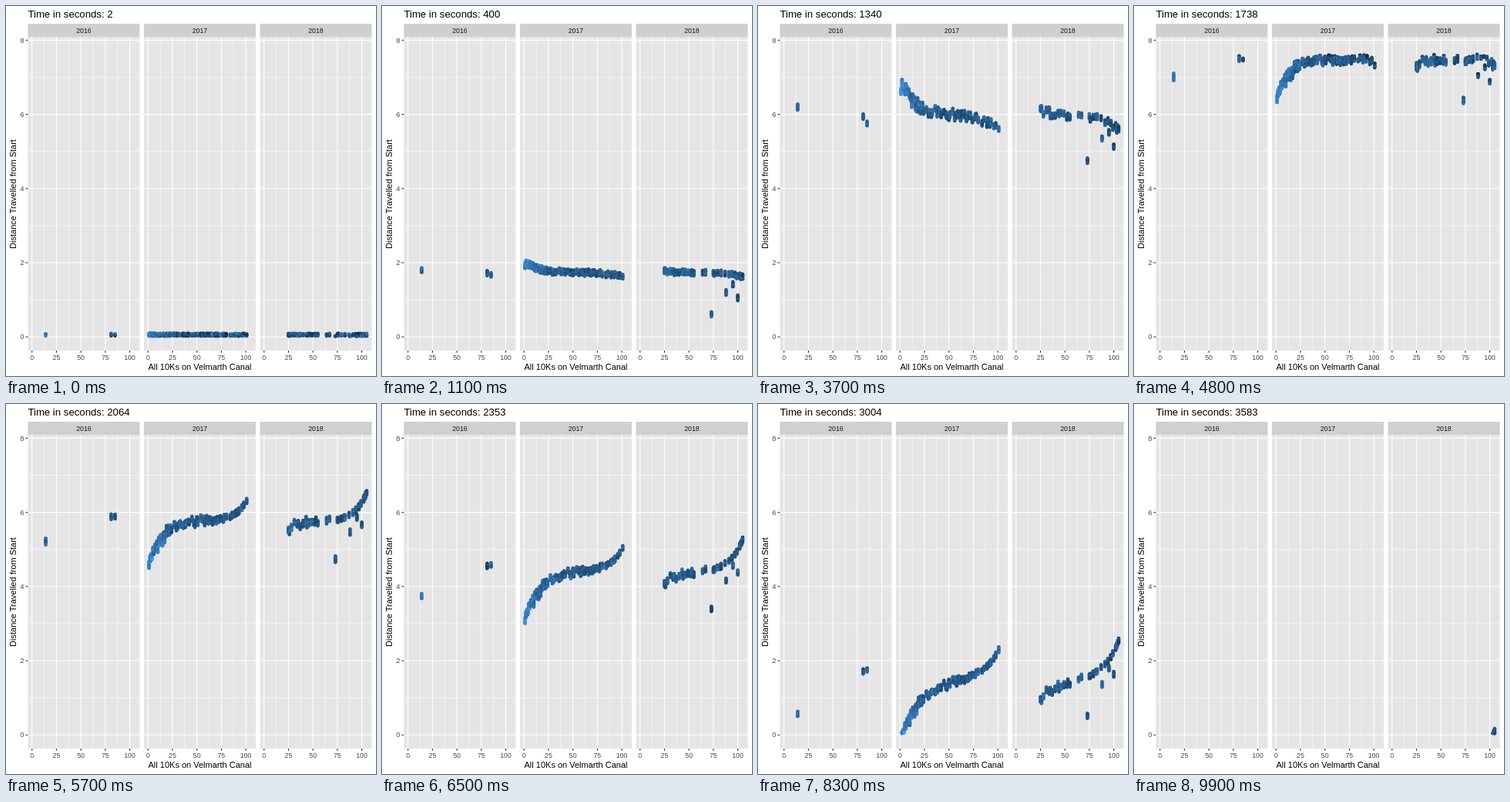
Recreate the animation shown at these times as an HTML page with a canvas. Size 480 by 480 pixels, loop 10 s.

```html
<!DOCTYPE html>
<html lang="en">
<head>
<meta charset="utf-8">
<title>Canal runs</title>
<style>
  html, body { margin: 0; width: 100%; height: 100%; overflow: hidden; background: #fff; }
  canvas, svg { position: absolute; left: 0; top: 0; width: 480px; height: 480px; }
  text { font-family: "Liberation Sans", Arial, sans-serif; }
</style>
</head>
<body>
<canvas id="plot"></canvas>
<svg id="labels" viewBox="0 0 480 480"></svg>
<script>
const LOOP = 10000, STEP = 100, COUNT = 100;
const FIRST = 2, LAST = 3583, HALF = 18;      // seconds on the clock, half window
const RUNS = 105;
const LEFT = 28.4, TOP = 40, BOTTOM = 447, GAP = 5.5;
const WIDTH = (474.5 - LEFT - 2 * GAP) / 3;
const UNIT = WIDTH / (1.1 * (RUNS - 1));      // 5 % of the range is added on each side

const panels = [2016, 2017, 2018].map((year, i) => {
  const left = LEFT + i * (WIDTH + GAP);
  return { year, left, zero: left + UNIT * 4.2 };
});
const px = (panel, v) => panel.zero + v * UNIT;
const py = v => 429.2 - v * 48.1;

const lerp = (a, b, u) => a + (b - a) * u;
const clamp = v => Math.min(1, Math.max(0, v));
function hash(a, b) {
  const s = Math.sin(a * 127.1 + b * 311.7) * 43758.5453;
  return s - Math.floor(s);
}
const noise = (a, b) => hash(a, b) - .5;

// Ranks are shared out between the three years
function yearOf(r) {
  if (r === 14 || r === 81 || r === 85) return 0;
  if (r > 101) return 2;
  if (r < 25 || (r > 56 && r < 64) || (r > 67 && r < 73)) return 1;
  const extra = r < 57 ? r % 9 === 8 : r > 72 && r % 4 === 3;
  return r % 3 === 1 || extra ? 2 : 1;
}

// Distance by which a few runs trail the field
const lag = { 73: 1.08, 88: .5, 95: .25, 100: .62 };

function makeRun(_, i) {
  const r = i + 1, q = r / 100;
  const fresh = Math.exp(-r / 17);
  return {
    rank: r,
    panel: panels[yearOf(r)],
    lag: lag[r] || 0,
    out: (5.98 + .85 * Math.exp(-r / 14) - .32 * q ** 4) * (1 + noise(r, 1) * (.03 + .04 * fresh)),
    home: 4.45 - 1.45 * fresh + .55 * q ** 8 + noise(r, 2) * .3 * (1 - r / 106),
    pace: 3.25 - .5 * q,
    peak: 7.65 - .1 * hash(r, 3),
    step: 4 + 3 * hash(r, 4),
    phase: 3 * hash(r, 5)
  };
}
const runs = Array.from({ length: RUNS }, makeRun);

// Out at a slowly rising pace, turn, then home
function distance(run, t) {
  const out = .02 + run.out * (t / 1340) ** 1.03;
  const u = (t - 2353) / 651;
  const back = run.home - run.pace * u + .3 * Math.min(0, u) ** 2;
  const y = Math.min(out, back, run.peak) - run.lag;
  return t < 1000 ? Math.max(.02, y) : y;
}

function shade(run, t, k) {
  const r = run.rank;
  let v = .42 + .42 * Math.exp(-r / 15);
  v += .1 * Math.sin(t / 130 + r * 2.4) + noise(r, k + 40) * .28;
  if (t < 40) v += noise(r, k + 90) * .5 - .06;
  if (distance(run, t) > run.peak - run.lag - .03) v -= .28;
  v = clamp(v);
  return `rgb(${lerp(14, 70, v)},${lerp(36, 160, v)},${lerp(58, 240, v)})`;
}

const canvas = document.getElementById("plot");
const ctx = canvas.getContext("2d");
const ratio = window.devicePixelRatio || 1;
canvas.width = canvas.height = 480 * ratio;
ctx.scale(ratio, ratio);

function line(x1, y1, x2, y2, width, color) {
  ctx.strokeStyle = color;
  ctx.lineWidth = width;
  ctx.beginPath();
  ctx.moveTo(x1, y1);
  ctx.lineTo(x2, y2);
  ctx.stroke();
}

function drawPanel(p) {
  const right = p.left + WIDTH;
  const across = (v, w) => line(p.left, py(v), right, py(v), w, "#fff");
  const down = (v, w) => line(px(p, v), TOP, px(p, v), BOTTOM, w, "#fff");
  ctx.fillStyle = "#d0d0d0";
  ctx.fillRect(p.left, 23, WIDTH, TOP - 23);
  ctx.fillStyle = "#e5e5e5";
  ctx.fillRect(p.left, TOP, WIDTH, BOTTOM - TOP);
  for (let v = 1; v < 8; v += 2) across(v, .55);
  for (let v = 12.5; v < 100; v += 25) down(v, .55);
  for (let v = 0; v <= 8; v += 2) across(v, 1.1);
  for (let v = 0; v <= 100; v += 25) {
    down(v, 1.1);
    line(px(p, v), BOTTOM, px(p, v), BOTTOM + 2.8, 1.1, "#333");
  }
}

function drawRun(run, now) {
  const x = px(run.panel, run.rank);
  const from = Math.max(0, Math.ceil((now - HALF - run.phase) / run.step));
  for (let k = from; ; k++) {
    const t = run.phase + k * run.step;
    if (t > now + HALF) break;
    const y = distance(run, t);
    if (t > 1000 && y < .03) break;
    ctx.fillStyle = shade(run, t, k);
    ctx.beginPath();
    ctx.arc(x, py(y), 2.35, 0, Math.PI * 2);
    ctx.fill();
  }
}

const svg = document.getElementById("labels");
function label(str, x, y, size, color, anchor = "middle", turn = 0) {
  const el = document.createElementNS("http://www.w3.org/2000/svg", "text");
  const set = { x, y, "font-size": size, fill: color, "text-anchor": anchor };
  if (turn) set.transform = `rotate(${turn} ${x} ${y})`;
  for (const name in set) el.setAttribute(name, set[name]);
  el.textContent = str;
  svg.appendChild(el);
  return el;
}

const title = label("", LEFT, 15, 13.2, "#000", "start");
label("All 10Ks on Velmarth Canal", 251.5, 472, 11, "#000");
label("Distance Travelled from Start", 13.3, 244, 11, "#000", "middle", -90);
for (let v = 0; v <= 8; v += 2) label(v, 23.4, py(v) + 3.2, 8.8, "#444", "end");
for (const p of panels) {
  label(p.year, p.left + WIDTH / 2, 35, 8.8, "#151515");
  for (let v = 0; v <= 100; v += 25) label(v, px(p, v), 459, 8.8, "#444");
}

let shown = -1;
function draw(index) {
  const now = Math.round(lerp(FIRST, LAST, index / (COUNT - 1)));
  title.textContent = "Time in seconds: " + now;
  ctx.fillStyle = "#fff";
  ctx.fillRect(0, 0, 480, 480);
  panels.forEach(drawPanel);
  for (let v = 0; v <= 8; v += 2) line(LEFT - 2.8, py(v), LEFT, py(v), 1.1, "#333");
  runs.forEach(run => drawRun(run, now));
}

const start = performance.now();
function tick() {
  const index = Math.floor(((performance.now() - start) % LOOP) / STEP);
  if (index !== shown) draw(shown = index);
  requestAnimationFrame(tick);
}
tick();
</script>
</body>
</html>
```
